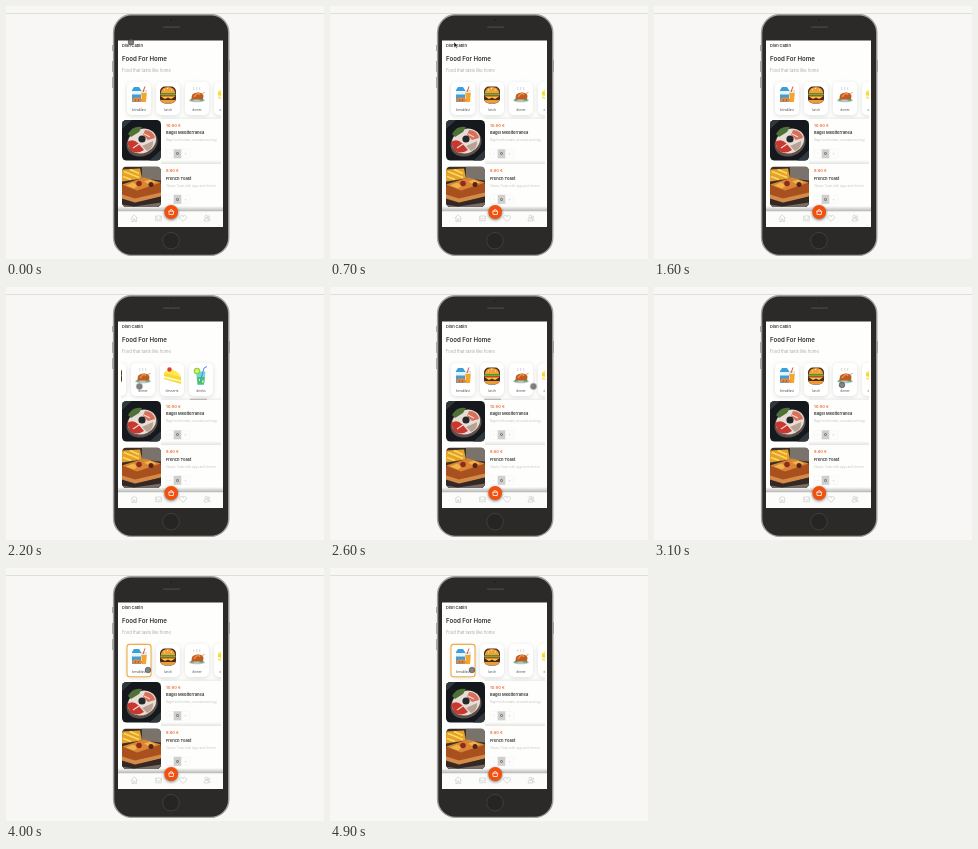
An HTML page for the animation above (5000 ms loop, 318 px wide and 253 px high).

```html
<!DOCTYPE html>
<html lang="en">
<head>
<meta charset="utf-8">
<title>Food app</title>
<style>
  html, body { margin: 0; width: 100%; height: 100%; overflow: hidden; background: #f8f7f5; }
  svg { display: block; width: 100vw; height: 100vh; }
  text { font-family: Inter, "Open Sans", sans-serif; fill: #303030; }
  .brand { font-size: 4px; font-weight: 600; }
  .title { font-size: 6.15px; font-weight: 600; }
  .sub { font-size: 4.15px; fill: #aaa; }
  .label { font-size: 3.2px; text-anchor: middle; fill: #555; }
  .price { font-size: 4.1px; font-weight: 600; fill: #ef6a32; }
  .name { font-size: 4.05px; font-weight: 600; }
  .desc { font-size: 2.95px; fill: #c4c4c2; }
  .count { font-size: 3.8px; text-anchor: middle; fill: #bbb; }
  .card { fill: #fff; filter: drop-shadow(0 1px 2px #0002); }
  .nav { fill: none; stroke: #c4c4c4; stroke-width: .6; stroke-linejoin: round; }

  .track, .dot, .arrow, .picked, .bar { animation: 5s step-end infinite; }
  .track { animation-name: track; }
  .dot { animation-name: dot; }
  .arrow { animation-name: arrow; }
  .picked { animation-name: picked; }
  .bar { animation-name: bar; }

  @keyframes track {
    0% { transform: translateX(0); }
    38% { transform: translateX(-7px); }
    40% { transform: translateX(-24px); }
    42% { transform: translateX(-44px); }
    44% { transform: translateX(-54px); }
    48% { transform: translateX(-37px); }
    50% { transform: translateX(-13px); }
    52%, 100% { transform: translateX(0); }
  }
  @keyframes dot {
    0% { transform: translate(125px, 36px); opacity: 1; }
    14% { transform: translate(195px, 47px); opacity: 0; }
    34% { transform: translate(195px, 47px); opacity: 1; }
    36% { transform: translate(190px, 84px); opacity: 1; }
    38% { transform: translate(180px, 97px); opacity: 1; }
    40% { transform: translate(163px, 99px); opacity: 1; }
    42% { transform: translate(143px, 99.4px); opacity: 1; }
    44% { transform: translate(133.4px, 99.4px); opacity: 1; }
    48% { transform: translate(150px, 99.4px); opacity: 1; }
    50% { transform: translate(186px, 99.4px); opacity: 1; }
    52% { transform: translate(203.4px, 99.4px); opacity: 1; }
    60% { transform: translate(199px, 99px); opacity: 1; }
    62% { transform: translate(188px, 98px); opacity: 1; }
    64% { transform: translate(172px, 97px); opacity: 1; }
    66% { transform: translate(157px, 97px); opacity: 1; }
    68% { transform: translate(146px, 97px); opacity: 1; }
    70% { transform: translate(142px, 97px); opacity: 1; }
    72% { transform: translate(142px, 100px); opacity: 1; }
    74%, 100% { transform: translate(142px, 102px); opacity: 1; }
  }
  @keyframes arrow {
    0% { transform: translate(124px, 36px); opacity: 0; }
    14% { transform: translate(124px, 36px); opacity: 1; }
    16% { transform: translate(124px, 29px); opacity: 1; }
    18% { transform: translate(124px, 16px); opacity: 1; }
    20% { transform: translate(124px, 4px); opacity: 1; }
    22%, 100% { transform: translate(124px, 4px); opacity: 0; }
  }
  @keyframes picked {
    0% { opacity: 0; }
    72% { opacity: .5; }
    74%, 100% { opacity: 1; }
  }
  @keyframes bar {
    0% { opacity: 0; transform: translateX(0); }
    38% { opacity: .7; transform: translateX(4px); }
    40% { opacity: .7; transform: translateX(13px); }
    42% { opacity: .7; transform: translateX(24px); }
    44% { opacity: .7; transform: translateX(30px); }
    48% { opacity: .7; transform: translateX(20px); }
    50% { opacity: .7; transform: translateX(7px); }
    52% { opacity: .7; transform: translateX(0); }
    58%, 100% { opacity: 0; transform: translateX(0); }
  }
</style>
</head>
<body>
<svg viewBox="0 0 318 253" preserveAspectRatio="none">
  <defs>
    <clipPath id="screen"><rect x="112" y="34.5" width="105" height="186.5"/></clipPath>
    <clipPath id="strip"><rect x="115" y="72" width="100" height="41"/></clipPath>
    <clipPath id="photo"><rect width="39" height="40.5" rx="4.5"/></clipPath>
    <linearGradient id="fade" x2="0" y2="1">
      <stop stop-color="#000" stop-opacity="0"/>
      <stop offset="1" stop-color="#000" stop-opacity=".3"/>
    </linearGradient>
    <g id="counter">
      <rect width="24" height="9" rx="1" fill="#fdfdfd" stroke="#f3f3f3" stroke-width=".5"/>
      <rect x="7.7" width="7.6" height="9" fill="#cfcfcd"/>
      <text class="count" x="3.8" y="5.8">-</text>
      <text class="count" x="11.5" y="5.9" style="fill: #333; font-weight: 600">0</text>
      <text class="count" x="19.5" y="5.8">+</text>
    </g>
    <rect id="card" class="card" x="-12" y="76" width="24" height="33" rx="5"/>
  </defs>

  <rect width="318" height="253" fill="#f8f7f5"/>
  <path d="M0 7.5H318" stroke="#dededb"/>

  <!-- Phone -->
  <path d="M106.8 39v6M106.8 55v11M106.8 71v11M223.3 54v12" stroke="#8b8b89"/>
  <rect x="107.6" y="8.8" width="115.2" height="240.6" rx="18" fill="#2b2a28" stroke="#a09f9d" stroke-width="1.4"/>
  <circle cx="165" cy="14" r="1" fill="#20201f"/>
  <rect x="157" y="20.2" width="17" height="1.8" rx=".9" fill="#40403e"/>
  <circle cx="165" cy="234.7" r="8.3" fill="#262524" stroke="#42413f" stroke-width=".9"/>

  <g clip-path="url(#screen)">
    <rect x="112" y="34" width="106" height="188" fill="#fefefd"/>
    <text class="brand" x="116" y="41.2">Dish Cabin</text>
    <text class="title" x="116" y="55.3">Food For Home</text>
    <text class="sub" x="116" y="65.8">Food that tasts like home</text>

    <!-- Categories -->
    <g clip-path="url(#strip)">
      <g class="track">
        <g transform="translate(133)">
          <use href="#card"/>
          <path d="M-7 84l2-3H0l2 3V96H-7Z" fill="#3d9fda"/>
          <path d="M-7 85H2v3.500H-7Z" fill="#e5f4fb"/>
          <path d="M2 84.500H8L7 96H3Z" fill="#f7a42b"/>
          <path d="M2 84.500H8L7.800 87H2.200Z" fill="#d9eef5"/>
          <path d="M4 86l2-5.500" stroke="#e24c35"/>
          <path d="M-7 95.500q1-5 5-4 4-1 6 4Z" fill="#e7873b"/>
          <path d="M-4 95l1-2m2 2 1-2" stroke="#9c4a25" stroke-width=".8"/>
          <text class="label" y="104.500">breakfast</text>
          <rect class="picked" x="-12" y="76.400" width="24" height="32.400" rx="2.500" fill="none" stroke="#f2ac42" stroke-width="1.100"/>
        </g>
        <g transform="translate(162)">
          <use href="#card"/>
          <rect x="-8" y="80.500" width="16" height="17" rx="5" fill="#4b2a1e"/>
          <path d="M-7.200 87Q-6.500 81 0 81T7.200 87Z" fill="#f0a036"/>
          <path d="M-4 84h1m2-1.500h1m3 1.500h1" stroke="#fff0b0"/>
          <rect x="-7.800" y="87.200" width="15.600" height="2.200" rx="1" fill="#5cb536"/>
          <rect x="-7.200" y="89.200" width="14.400" height="1.600" fill="#dc4030"/>
          <path d="M-7 90.500H7l-4 2.500-3-1.500-3 1.500Z" fill="#f8ce3b"/>
          <path d="M-7.200 94H7.200Q7.200 97 4 97H-4Q-7.200 97-7.200 94Z" fill="#ee9a35"/>
          <text class="label" y="104.500">lunch</text>
        </g>
        <g transform="translate(191)">
          <use href="#card"/>
          <ellipse cy="94.300" rx="8" ry="2" fill="#b9c4c5"/>
          <path d="M-5.500 93.500Q-6.500 86.500 1 86.500T6 93.500Z" fill="#c25a24"/>
          <path d="M-3 91q4-6 6-2" fill="none" stroke="#e98e3f" stroke-width="1.600"/>
          <path d="M5 88l2.500-2" stroke="#e6bd87" stroke-width="1.300"/>
          <path d="M-7 94.500q2-4 4 0m5 0q3-4 5 0" fill="#54a043"/>
          <path d="M-3 84q-1-1.500 0-3m3 3q-1-1.500 0-3m3 3q-1-1.500 0-3" fill="none" stroke="#c4c4c4" stroke-width=".7"/>
          <text class="label" y="104.500">dinner</text>
        </g>
        <g transform="translate(220)">
          <use href="#card"/>
          <path d="M-8 86L-3 82 9 90V97L-8 92Z" fill="#f8d92f"/>
          <path d="M-8 89L9 93.500V95L-8 91Z" fill="#fff6cf"/>
          <path d="M-8 86L-3 82Q6 83 9 90Z" fill="#ffe94f"/>
          <circle cx="-2.500" cy="82.500" r="2.200" fill="#df3d36"/>
          <text class="label" y="104.500">desserts</text>
        </g>
        <g transform="translate(249)">
          <use href="#card"/>
          <path d="M-5 84.500H4.500L3 98H-3.500Z" fill="#69d9de"/>
          <path d="M-4.200 90H3.900L2.900 97.300H-3.200Z" fill="#4fc46a"/>
          <path d="M-2 92h2v2h-2Zm3 1.500h1.500v2H1Z" fill="#cdf5e5"/>
          <path d="M-1 95L3 81l3-1.500" fill="none" stroke="#4e8ade"/>
          <circle cx="-4" cy="84" r="3.300" fill="#8bd342"/>
          <circle cx="-4" cy="84" r="2" fill="#e9ef66"/>
          <text class="label" y="104.500">drinks</text>
        </g>
      </g>
      <rect class="bar" x="154" y="111.800" width="17" height=".9" fill="#98887c"/>
    </g>

    <!-- Dishes -->
    <rect x="155" y="110" width="60" height="3" fill="url(#fade)" opacity=".2"/>
    <rect x="155" y="154" width="60" height="4" fill="url(#fade)" opacity=".35"/>
    <g transform="translate(116 114)" clip-path="url(#photo)">
      <rect width="39" height="41" fill="#15191d"/>
      <path d="M0 0H10L0 9ZM39 30V41H27Z" fill="#30383d"/>
      <ellipse cx="20" cy="23" rx="16" ry="13" fill="#5f5049" transform="rotate(-25 20 23)"/>
      <ellipse cx="20" cy="21" rx="14.500" ry="12" fill="#e6ded6" transform="rotate(-25 20 21)"/>
      <path d="M6 14q5-9 14-7l-3 5-8 5Z" fill="#4d7136"/>
      <path d="M5 22q6-4 11 1l6 7q-8 5-14 0Z" fill="#c9382e"/>
      <path d="M23 10q8 0 10 8l-7 2-5-5Z" fill="#d9705c"/>
      <path d="M20 26l11-5q1 7-6 10Z" fill="#b9a294"/>
      <circle cx="20" cy="19" r="3.600" fill="#24282a"/>
      <path d="M11 28l6-4m5-10 6 3" stroke="#f1d9d0" stroke-width="1.200"/>
    </g>
    <text class="price" x="160" y="121.300">10.90 €</text>
    <text class="name" x="160" y="127.800">Bagel Mediterranea</text>
    <text class="desc" x="160" y="135.200">Bagel with tomato, avocado and egg</text>
    <use href="#counter" x="160" y="143.300"/>

    <g transform="translate(116 160.500)" clip-path="url(#photo)">
      <rect width="39" height="41" fill="#3a2f29"/>
      <path d="M20 0H39V14L20 12Z" fill="#79736b"/>
      <path d="M0 3L18 2 20 12 0 15Z" fill="#e4a12c"/>
      <path d="M2 5l15 6m-9-8 9 4M1 10l8 3" stroke="#ffd95b" stroke-width="1.500"/>
      <path d="M0 19L22 12 39 17V28L13 33 0 29Z" fill="#a9501f"/>
      <path d="M0 18L22 11 39 16 15 24Z" fill="#d98535"/>
      <path d="M4 19l7-3 5 3-4 3Zm18-4 6-2 6 3-7 2Z" fill="#f0b347"/>
      <circle cx="17" cy="17" r="2.800" fill="#8d2b1e"/>
      <circle cx="29" cy="18" r="2.500" fill="#582319"/>
      <path d="M0 28l13 4 26-6v4L13 36 0 32Z" fill="#d58a48"/>
      <path d="M0 33l13 4 26-7V41H0Z" fill="#332824"/>
      <path d="M0 38l12 2 27-4v5H0Z" fill="#776d66"/>
    </g>
    <text class="price" x="160" y="166.300">8.60 €</text>
    <text class="name" x="160" y="173.500">French Toast</text>
    <text class="desc" x="160" y="180.700">Classic Toast with eggs and cheese</text>
    <use href="#counter" x="160" y="188.800"/>

    <!-- Navigation -->
    <rect x="112" y="200" width="106" height="5.500" fill="url(#fade)"/>
    <rect x="112" y="205.500" width="106" height="16" fill="#fcfcfb"/>
    <path class="nav" d="M125 212l3.200-3 3.200 3m-5.500-.7v4.200h1.700v-2.500h1.300v2.500h1.700v-4.200M149.700 210h5.600v4.800h-5.600Zm0 1.600 2.800 1.800 2.800-1.800M177 215.300q-6-4-1.800-6 1.800 0 1.800 1.500 0-1.500 1.800-1.500 4.200 2-1.800 6ZM198 215q0-3 2.300-3t2.300 3Zm4-2.600q2.300 0 2.300 2.600"/>
    <circle class="nav" cx="200.300" cy="210.500" r="1.300"/>
    <circle class="nav" cx="202.800" cy="210.800" r=".9"/>
    <circle cx="165.200" cy="206" r="6.900" fill="#f2500f" style="filter: drop-shadow(0 1px 1.500px #0008)"/>
    <path d="M162.700 205.200h5l-.5 3.300h-4Zm1.100 0q0-1.700 1.400-1.700t1.400 1.700" fill="none" stroke="#fff" stroke-width=".8" stroke-linejoin="round"/>
  </g>

  <g class="dot">
    <circle r="2.800" fill="#555" fill-opacity=".72" stroke="#444" stroke-width=".6"/>
  </g>
  <path class="arrow" d="M0 0V5.500L1.300 4.300 2.200 6.300 3.100 5.900 2.200 4H3.900Z" fill="#111" stroke="#fff" stroke-width=".4"/>
</svg>
</body>
</html>
```
